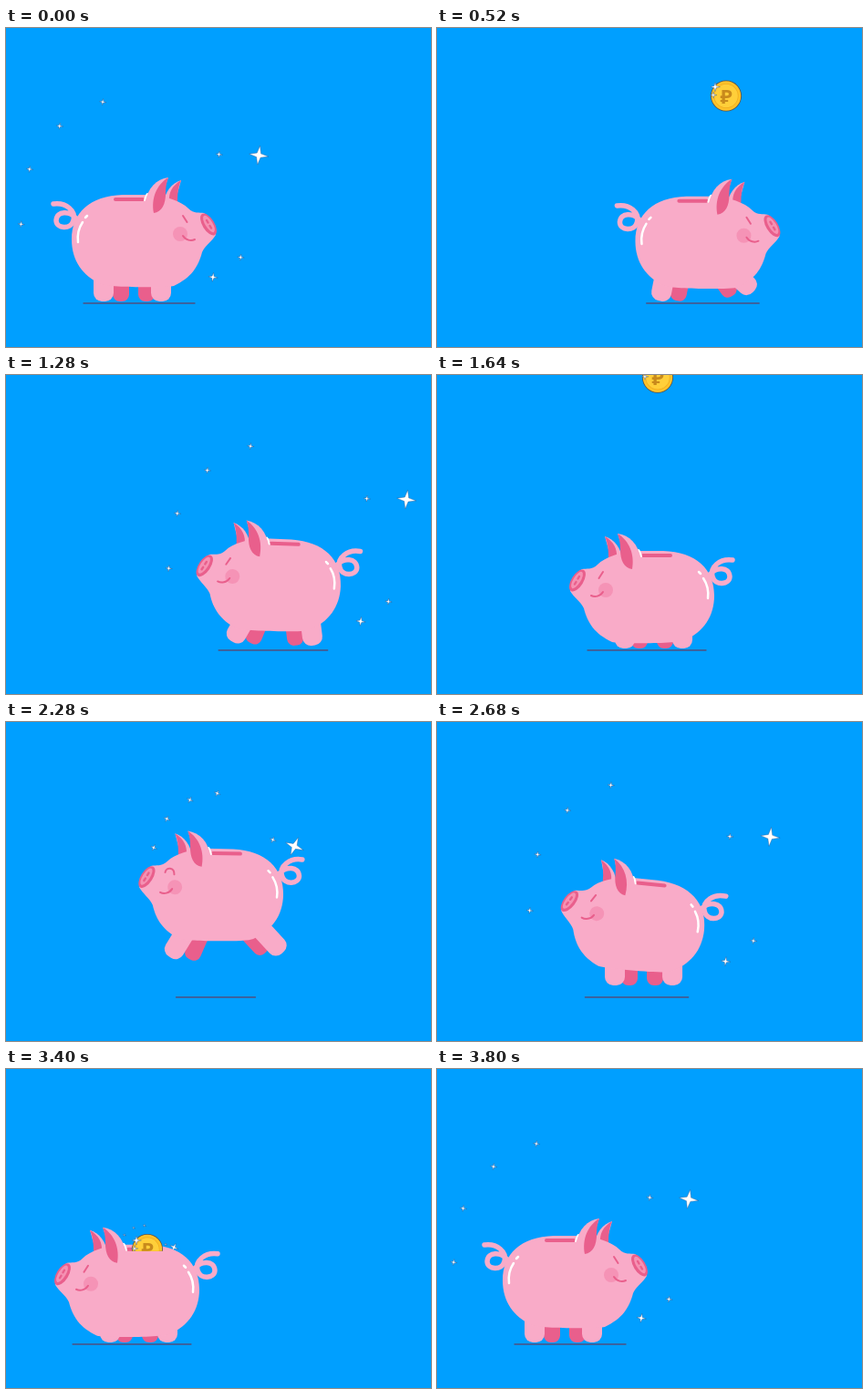
An HTML page with a canvas that plays this animation: 466 px wide and 350 px high, repeating every 3.84 s.

```html
<!DOCTYPE html>
<html lang="en">
<head>
<meta charset="utf-8">
<title>Piggy bank</title>
<style>
  html, body { margin: 0; width: 100%; height: 100%; overflow: hidden; background: #009fff; }
  canvas { display: block; }
</style>
</head>
<body>
<canvas id="stage" width="466" height="350"></canvas>
<script>
const ctx = document.getElementById('stage').getContext('2d');
const LOOP = 3840, STEP = 40, FALL = 650;
const SLOT_Y = 188, GROUND = 300, AXIS = 142;
const PINK = '#f9abc8', ROSE = '#e95f8c', WHITE = '#fff';

const walks = [
  { from: 0, to: 765, dx: 183, hops: 3 },
  { from: 1060, to: 1620, dx: -91, hops: 2 },
  { from: 2480, to: 3300, dx: -92, hops: 2 },
];
// The pig ducks when a coin lands, then jumps; turn is the change of facing
const coins = [
  { x: 317, land: 840, jump: 30, turn: -2 },
  { x: 242, land: 2190, jump: 45, turn: 0 },
  { x: 155, land: 3400, jump: 12, turn: 2 },
];

const progress = (t, from, to) => Math.min(1, Math.max(0, (t - from) / (to - from)));
const ease = u => u < .5 ? 2 * u * u : 1 - 2 * (1 - u) ** 2;
const bump = (t, center, reach) =>
  Math.abs(t - center) < reach ? Math.cos((t - center) / reach * Math.PI / 2) ** 2 : 0;
const sum = (list, f) => list.reduce((total, item) => total + f(item), 0);

function pose(t) {
  const x = AXIS + sum(walks, w => w.dx * ease(progress(t, w.from, w.to)));
  const facing = 1 + sum(coins, c => c.turn * ease(progress(t, c.land + 60, c.land + 160)));
  const hop = sum(walks, w => Math.sin(Math.PI * w.hops * progress(t, w.from, w.to)) ** 2);
  const walking = sum(walks, w => Math.min(1, 5 * Math.sin(Math.PI * progress(t, w.from, w.to))));
  const stride = (1 - hop) * walking;
  const y = 2 * stride - 11 * hop
    + sum(walks, w => 10 * bump(t, w.to + 20, 60))
    + sum(coins, c => 10 * bump(t, c.land, 100) - c.jump * bump(t, c.land + 100, 110)
      + 7 * bump(t, c.land + 250, 70));
  return { x, y, facing, hop, stride, air: Math.max(0, -y - 12) / 32 };
}

function fill(path, color) {
  ctx.fillStyle = color;
  ctx.fill(new Path2D(path));
}

function stroke(path, color, width) {
  ctx.strokeStyle = color;
  ctx.lineWidth = width;
  ctx.stroke(new Path2D(path));
}

function ellipse(x, y, rx, ry, color, angle = 0) {
  ctx.beginPath();
  ctx.ellipse(x, y, rx, ry, angle, 0, 7);
  ctx.fillStyle = color;
  ctx.fill();
}

function drawStar(x, y, r, tilt = 0) {
  ctx.beginPath();
  for (let i = 0; i < 8; i++) {
    const a = tilt + i * Math.PI / 4, d = i % 2 ? r * .3 : r;
    ctx.lineTo(x + d * Math.cos(a), y + d * Math.sin(a));
  }
  ctx.closePath();
  ctx.fillStyle = WHITE;
  ctx.fill();
  ctx.strokeStyle = '#31558b';
  ctx.lineWidth = .4;
  ctx.stroke();
}

// Stars fly out from the slot and unwind to their rest angles
function drawBurst(coin, t, slotY) {
  const age = (t - coin.land + 40 + LOOP) % LOOP;
  if (age > 680) return;
  const spread = 1.05 * (1 - Math.exp(-age / 170));
  const turn = .32 * (1 - Math.min(1, spread) ** 4);
  const scale = Math.min(1, age / 90, (680 - age) / 150);
  const arc = (count, degrees, step, radius, grow, size, swell) => {
    for (let i = 0; i < count; i++) {
      const a = (degrees + step * i) * Math.PI / 180 + turn;
      const d = (radius + grow * i) * spread;
      drawStar(coin.x + d * Math.cos(a), slotY + d * Math.sin(a), (size + swell * i) * scale, .12 + turn);
    }
  };
  arc(4, 168, 25.5, 143, -8, 3.5, 0);
  arc(2, -33, 10.5, 94, 39, 3.5, 7);
  arc(2, 31, 18, 122, -9, 3.5, 1.5);
}

function drawCoin(coin, t, slotY) {
  const u = 1 + (t - coin.land) / FALL;
  if (u < 0 || u > 1.12) return;
  const { x } = coin, y = -18 + 216 * u ** 1.25;
  ctx.save();
  ctx.beginPath();
  ctx.rect(0, 0, 466, slotY + 2);
  ctx.clip();
  ellipse(x, y, 17, 17, '#5a5048');
  ellipse(x, y, 16.2, 16.2, '#fcc22b');
  ellipse(x, y, 13.5, 13.5, '#f2ac1e');
  ellipse(x, y, 12.8, 12.8, '#ffcf3a');
  ctx.fillStyle = '#c88a1c';
  ctx.font = 'bold 22px "Noto Sans", sans-serif';
  ctx.textAlign = 'center';
  ctx.fillText('₽', x, y + 8);
  drawStar(x - 12, y - 10, 5);
  drawStar(x - 14, y - 1, 3.5);
  ctx.restore();
}

function drawLeg(x, width, angle, extra, color) {
  ctx.save();
  ctx.translate(x + angle * 8, 266);
  ctx.rotate(-angle);
  ctx.beginPath();
  ctx.roundRect(-width / 2, -6, width, GROUND - 260 + extra, width * .42);
  ctx.fillStyle = color;
  ctx.fill();
  ctx.restore();
}

function drawBody(happy) {
  // Tail, far ear, trunk
  stroke('M52 193C66 191 77 201 74 211C71 222 55 220 55 211C56 200 70 201 76 208L84 216', PINK, 5.5);
  fill('M172 195C174 179 182 170 192 167L185 192Z', PINK);
  fill('M192 167C182 173 178 181 179 191L188 190C188 181 189 174 192 167Z', ROSE);
  fill('M72 232C72 203 92 184 128 183L158 183C175 184 192 190 200 198C206 204 212 202 217 203' +
    'C224 207 231 219 230 227C226 234 218 239 215 246C211 262 203 274 184 283' +
    'C178 285 112 285 104 281C84 272 72 255 72 232Z', PINK);
  // Slot, near ear, highlights
  stroke('M120 188H150', ROSE, 4);
  stroke('M152 189C153 186 153 184 155 182', WHITE, 2);
  fill('M153 192C155 175 165 166 178 164L165 203Z', PINK);
  fill('M178 164C165 172 159 187 162 203C171 202 175 193 175 182C175 175 176 169 178 164Z', ROSE);
  stroke('M79 235C78 227 80 219 84 213M87 208L89 206', WHITE, 2.5);
  // Face
  ellipse(222, 215.5, 6.5, 13.5, ROSE, -.55);
  ellipse(222.5, 215, 4, 10.5, '#f591b3', -.55);
  stroke('M220 211L221.500 213.500M223.500 217L225 219.500', ROSE, 2.4);
  ellipse(191, 226, 8, 8, '#f593b6');
  stroke('M194 228C197 233 203 234 207 232', ROSE, 2);
  stroke(happy ? 'M192 212C192 204 201 204 202 210' : 'M194 206L198.500 213', ROSE, 2);
}

function drawPig({ x, y, facing, hop, stride, air }) {
  const front = stride * .85 + air * .55, rear = -stride * .2 - air * .75;
  ctx.save();
  ctx.translate(x, Math.min(y, 0));
  ctx.scale(facing, 1);
  ctx.translate(-AXIS, 0);
  drawLeg(126, 18, rear, 8 * air, ROSE);
  drawLeg(154, 18, front * .75, 8 * air, ROSE);
  drawLeg(107, 22, rear, 8 * air, PINK);
  drawLeg(170, 22, front, 8 * air, PINK);
  // The trunk sinks between planted feet and tips nose-up in a hop
  ctx.translate(AXIS, Math.max(y, 0) + 235);
  ctx.rotate(-.1 * hop - .02 * air);
  ctx.translate(-AXIS, -235);
  drawBody(air > .3);
  ctx.restore();
}

function draw(t) {
  const pig = pose(t), slotY = SLOT_Y + pig.y;
  const middle = pig.x + 4 * pig.facing, half = 61 + pig.y * .4;
  ctx.fillStyle = '#009fff';
  ctx.fillRect(0, 0, 466, 350);
  ctx.lineCap = 'round';
  stroke(`M${middle - half} 302H${middle + half}`, '#4f5080', 1.4);
  coins.forEach(c => drawBurst(c, t, slotY));
  drawPig(pig);
  coins.forEach(c => drawCoin(c, t, slotY));
}

const start = performance.now();
function tick() {
  const t = (performance.now() - start) % LOOP;
  draw(Math.floor(t / STEP) * STEP);
  requestAnimationFrame(tick);
}
tick();
</script>
</body>
</html>
```
